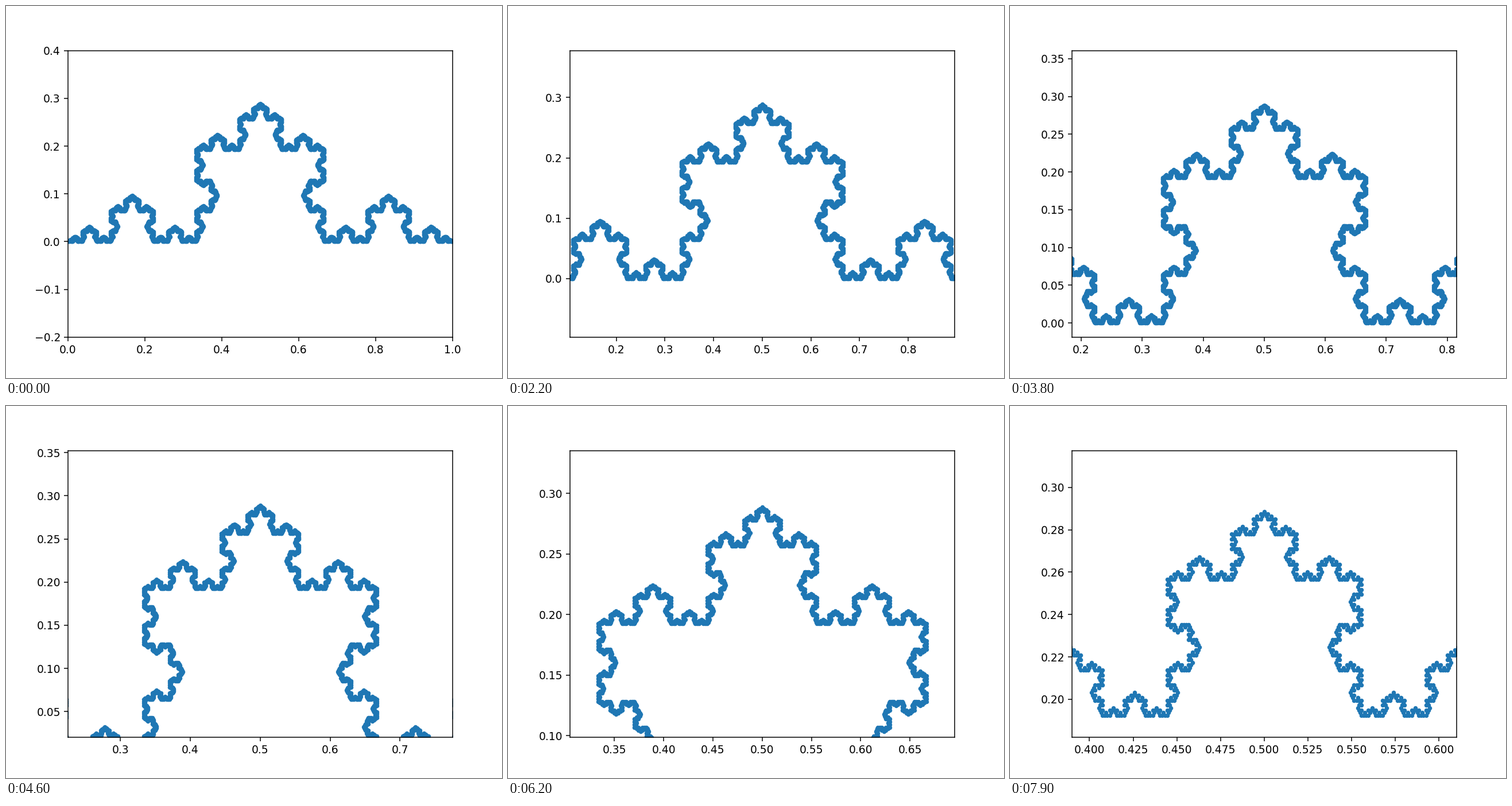
Animation, 864 px wide and 648 px high, one loop 8000 ms. Source, as a matplotlib script:

```python
import numpy as np
import matplotlib.pyplot as plt
from matplotlib.animation import FuncAnimation

FRAMES = 80
INTERVAL = 100
DEPTH = 6


def koch(depth):
    """Vertices of the Koch curve on [0, 1] as complex numbers."""
    pts = np.array([0, 1], dtype=complex)
    turn = np.exp(1j * np.pi / 3)
    for _ in range(depth):
        start, step = pts[:-1], np.diff(pts) / 3
        corners = [start, start + step, start + step * (1 + turn), start + 2 * step]
        pts = np.append(np.column_stack(corners).ravel(), pts[-1])
    return pts


fig, ax = plt.subplots(figsize=(6.4, 4.8), dpi=135)
curve = koch(DEPTH)
ax.plot(curve.real, curve.imag, ".", color="#1f77b4")


def zoom(frame):
    k = max(frame - 1, 0)  # the first view is held for one extra frame
    ax.set_xlim(0.005 * k, 1 - 0.005 * k)
    ax.set_ylim(-0.2 + 0.0049 * k, 0.4 - 0.00106 * k)
    return ax.lines


anim = FuncAnimation(fig, zoom, frames=FRAMES, interval=INTERVAL,
                     init_func=lambda: zoom(0), repeat=True, repeat_delay=0,
                     blit=False)
plt.show()
```
